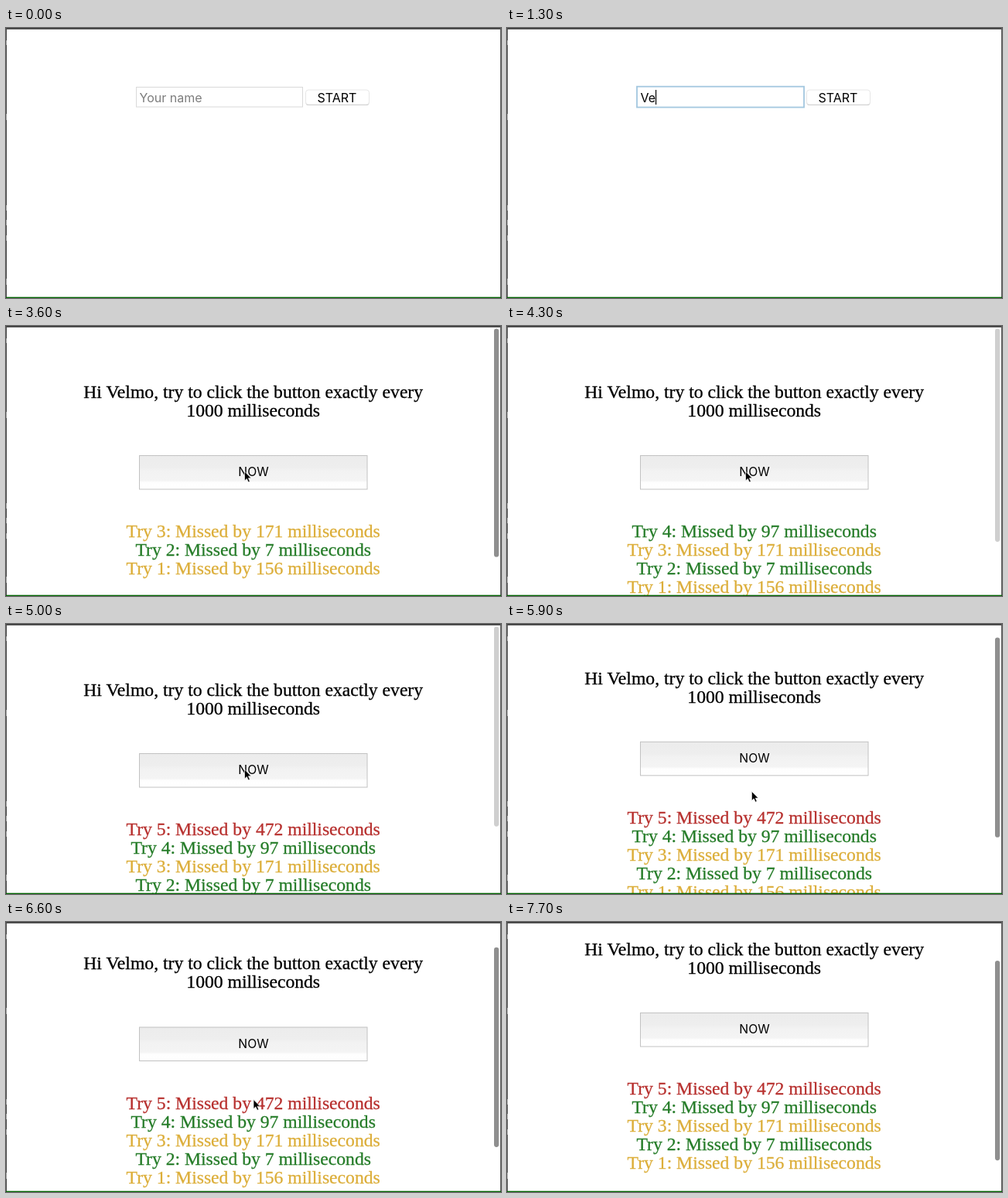
Recreate the animation shown at these times as an HTML page. Size 640 by 349 pixels, loop 7.8 s.

```html
<!DOCTYPE html>
<html lang="en">
<head>
<meta charset="utf-8">
<title>Click timing game</title>
<style>
  html, body { margin: 0; width: 100%; height: 100%; overflow: hidden; background: #fff; }
  svg { display: block; width: 100%; height: 100%; }
  .ui { font: 16px Inter, Roboto, sans-serif; }
  .page { font: 23.65px "Liberation Serif", "Noto Serif", serif; text-anchor: middle; }
  .page text { stroke-width: .3; }
  .mid { text-anchor: middle; }
</style>
</head>
<body>
<svg viewBox="0 0 640 349">
  <defs>
    <linearGradient id="face" x2="0" y2="1">
      <stop offset="0" stop-color="#ececec"/>
      <stop offset=".35" stop-color="#eeeeee"/>
      <stop offset=".45" stop-color="#f2f2f2"/>
      <stop offset=".74" stop-color="#f4f4f4"/>
      <stop offset=".8" stop-color="#fefefe"/>
      <stop offset="1" stop-color="#fff"/>
    </linearGradient>
  </defs>
  <rect width="640" height="349" fill="#fff"/>

  <g id="form" class="ui">
    <rect id="field" fill="#fff"/>
    <text id="entry" x="172.5" y="95.5"></text>
    <path id="caret" stroke="#000" stroke-width="1.2"/>
    <rect x="387.5" y="80.7" width="82" height="19.3" rx="3.5" fill="#c9c9c9"/>
    <rect x="387.5" y="80" width="82" height="19" rx="3.5" fill="#fff" stroke="#e2e2e2" stroke-width=".8"/>
    <text class="mid" x="428" y="95.5">START</text>
  </g>

  <g id="game">
    <g class="page">
      <g stroke="#000">
        <text id="hello" x="319.7" y="92.8"></text>
        <text x="319.7" y="116.8">1000 milliseconds</text>
      </g>
      <g id="rows"></g>
    </g>
    <rect x="172.5" y="167.5" width="294.5" height="43.5" fill="url(#face)" stroke="#c2c2c2"/>
    <text class="ui mid" x="320" y="194.3" style="font-size:15.7px">NOW</text>
  </g>

  <rect id="thumb" x="631" width="6.2" rx="3.1" fill="#8f8f8f"/>
  <circle id="ring" r="19.3" fill="none" stroke="#111" stroke-width="1.4"/>
  <path id="arrow" d="M0 0V12L2.8 9.4 4.8 13.8 6.8 12.9 4.9 8.7H8.6Z" stroke="#fff" stroke-width=".7"/>

  <g id="frame">
    <rect width="640" height="1.7" fill="#383838"/>
    <rect width="1" height="349" fill="#4a4a4a"/>
    <rect x="639" width="1" height="349" fill="#5a5a5a"/>
    <rect y="347.7" width="640" height="1.3" fill="#006400"/>
    <path d="M.5 16v6M.5 111v8M.5 229v7M.5 248v7M.5 268v7M.5 324v8" stroke="#a0a0a0"/>
  </g>
</svg>
<script>
const LOOP = 7800, STEP = 100;
const NAME = "Velmo";
const GOLD = "#dcae3a", GREEN = "#257c28", RED = "#b7302e";

const keyTimes = [1000, 1200, 1400, 1500, 1600];
const tries = [
  { at: 2800, miss: 156, color: GOLD },
  { at: 3100, miss: 7, color: GREEN },
  { at: 3500, miss: 171, color: GOLD },
  { at: 4100, miss: 97, color: GREEN },
  { at: 4800, miss: 472, color: RED }
];
const clicks = [600, 1800, ...tries.map(t => t.at - STEP)];
const pointer = [
  [100, 330, 150], [400, 300, 48], [600, 290, 86], [1500, 300, 88],
  [1700, 444, 89], [1800, 444, 89], [2200, 308.5, 188], [5400, 308.5, 188],
  [6200, 320, 229.5], [6900, 320, 229.5], [7600, 144, 349]
];

const $ = id => document.getElementById(id);
const set = (id, attrs) => {
  for (const k in attrs) $(id).setAttribute(k, attrs[k]);
};
const show = (id, on) => { $(id).style.display = on ? "" : "none"; };
const clamp = v => Math.min(1, Math.max(0, v));
const ease = (t, a, b) => {
  const p = clamp((t - a) / (b - a));
  return p * p * (3 - 2 * p);
};

$("hello").textContent = `Hi ${NAME}, try to click the button exactly every`;
const rows = tries.map((item, i) => {
  const row = document.createElementNS("http://www.w3.org/2000/svg", "text");
  row.textContent = `Try ${i + 1}: Missed by ${item.miss} milliseconds`;
  row.setAttribute("x", 319.7);
  row.setAttribute("fill", item.color);
  row.setAttribute("stroke", item.color);
  return $("rows").appendChild(row);
});

function pointerAt(t) {
  let i = 1;
  while (i < pointer.length - 1 && pointer[i][0] < t) i++;
  const [a, b] = [pointer[i - 1], pointer[i]];
  const p = ease(t, a[0], b[0]);
  return [a[1] + (b[1] - a[1]) * p, a[2] + (b[2] - a[2]) * p];
}

function drawForm(t) {
  const focused = t >= 600;
  const typed = NAME.slice(0, keyTimes.filter(k => k <= t).length);
  set("field", focused
    ? { x: 168, y: 75.7, width: 216, height: 26.8, stroke: "#a3c7df", "stroke-width": 1.8 }
    : { x: 168.5, y: 76.5, width: 215, height: 25.5, stroke: "#d9d9d9", "stroke-width": 1 });
  $("entry").textContent = typed || "Your name";
  set("entry", { fill: typed ? "#000" : "#7d7d7d" });
  const x = 173 + (typed ? $("entry").getComputedTextLength() : 0);
  set("caret", { d: `M${x} 80V99` });
  show("caret", focused);
}

function drawGame(t) {
  const count = tries.filter(item => item.at <= t).length;
  const scroll = 25 * ease(t, 5500, 6200) + 25 * ease(t, 6400, 7000);
  set("game", { transform: `translate(0 ${-scroll})` });
  rows.forEach((row, i) => {
    row.style.display = i < count ? "" : "none";
    row.setAttribute("y", 273.2 + 24 * (count - 1 - i));
  });

  // The bar flashes when a row is added and stays while scrolling.
  const last = count ? tries[count - 1].at : 0;
  const flash = 1 - clamp((t - last - 120) / 140);
  const opacity = count < 2 ? 0 : Math.max(flash, clamp((t - 5500) / 100));
  set("thumb", { y: 3.5 + scroll * 0.93, height: 117600 / (313 + 28.5 * count), opacity });
}

function draw(t) {
  const playing = t >= 1900;
  show("form", !playing);
  show("game", playing);
  show("thumb", playing);
  playing ? drawGame(t) : drawForm(t);

  const [x, y] = pointerAt(t);
  set("arrow", { transform: `translate(${x} ${y})` });
  show("arrow", t >= 100 && t < 7600 && !(t >= 1000 && t < 1500));
  set("ring", { cx: x, cy: y });
  show("ring", clicks.some(c => t >= c && t < c + STEP));
}

const start = performance.now();
function tick() {
  const t = (performance.now() - start) % LOOP;
  draw(Math.floor(t / STEP) * STEP);
  requestAnimationFrame(tick);
}
tick();
</script>
</body>
</html>
```
